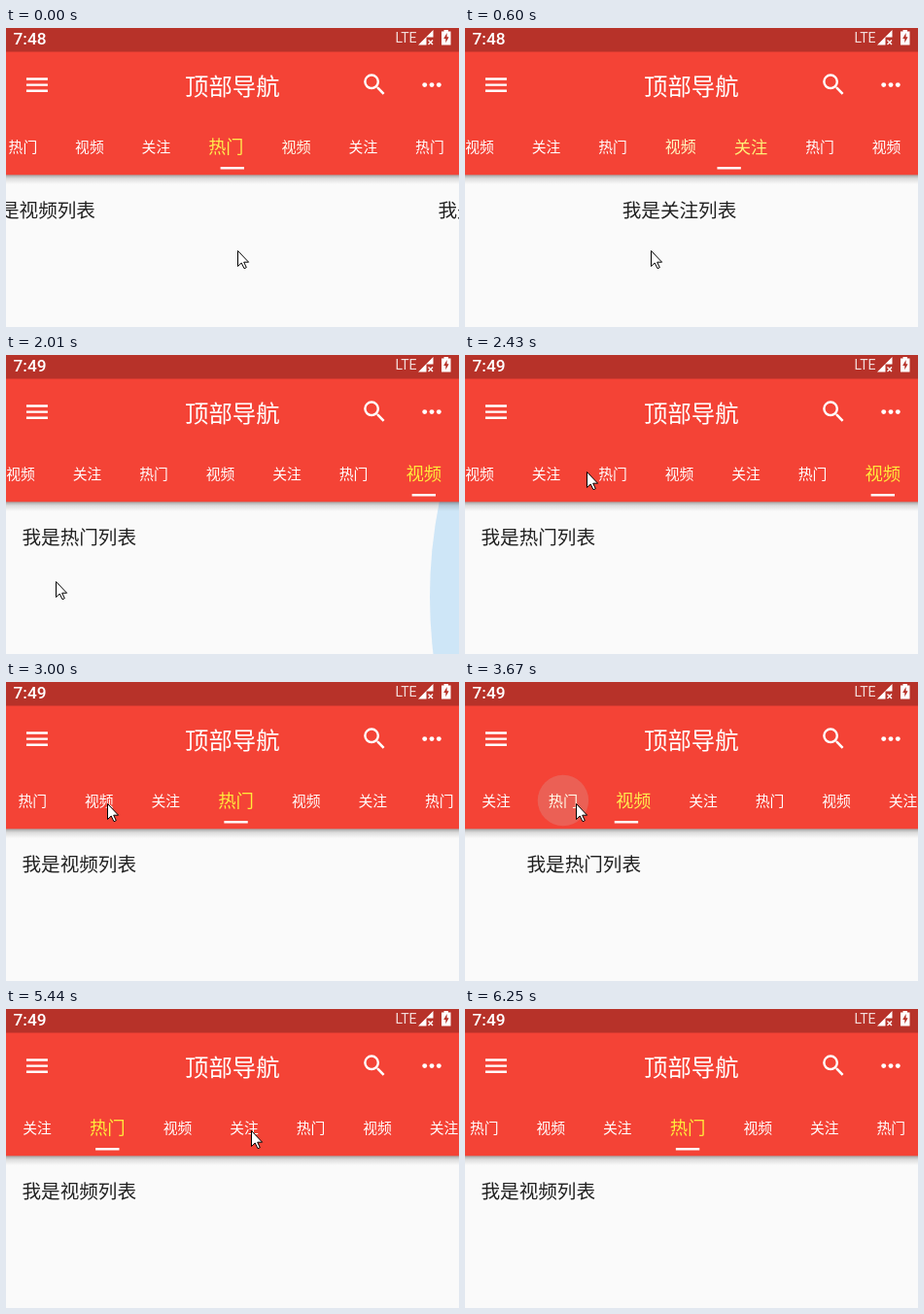
Recreate the animation shown at these times as an HTML page with a canvas. Size 466x308 px, loop 7120 ms.

```html
<!DOCTYPE html>
<html lang="zh-CN">
<head>
<meta charset="utf-8">
<style>
html, body { margin: 0; width: 100%; height: 100%; overflow: hidden; background: #fafafa; }
canvas { display: block; }
</style>
</head>
<body>
<canvas id="stage" width="466" height="308"></canvas>
<script>
const ctx = document.getElementById('stage').getContext('2d');
const CJK = '"Noto Sans CJK SC", "Noto Sans CJK JP", sans-serif';
const LOOP = 7120, WIDTH = 470, LEFT = -2.2, TAB = 68.5, GROW = 7.5, COUNT = 9;
const MAX_SCROLL = COUNT * TAB + GROW - WIDTH;
const LABELS = ['关注', '热门', '视频'];
const PAGES = LABELS.map((_, i) => `我是${LABELS[-i + 3 * (i > 0)]}列表`);

// Four evenly spaced swipes, then taps given as start time and tab
const swipes = [5, 6, 7, 8].map((to, n) => ({ start: 430 * n - 90, to, length: 430 }));
const taps = [[2578, 4], [3240, 2], [3640, 1], [4075, 3], [4870, 1], [5710, 4]]
  .map(([start, to]) => ({ start, to, length: 300, tap: true }));
const MOVES = [...swipes, ...taps];
MOVES.forEach((move, n) => move.from = n ? MOVES[n - 1].to : 4);

// Pointer stops: time, x, y
const STOPS = [
  [0, 239, 229], [1260, 200, 229], [2010, 51, 233], [2430, 125, 120], [2850, 104, 125],
  [3640, 104, 125], [4360, 328, 121], [4630, 88, 124], [4870, 88, 124], [5440, 252, 125],
  [5590, 318, 125], [5830, 318, 125], [6100, 400, 295], [6250, 400, 295]
];

const MENU = new Path2D('M3 6h18v2H3zm0 5h18v2H3zm0 5h18v2H3z');
const SEARCH = new Path2D('M15.5 14h-.79l-.28-.27A6.47 6.47 0 0 0 16 9.5 6.5 6.5 0 1 0 9.5 16c1.61 0 3.09-.59 4.23-1.57l.27.28v.79l5 4.99L20.49 19zm-6 0C7.01 14 5 11.99 5 9.5S7.01 5 9.5 5 14 7.01 14 9.5 11.99 14 9.5 14z');
const ARROW = new Path2D('M.5.5V16.5L4.2 13 7 18.7 9.3 17.7 6.7 12.2H11.6Z');
const SIGNAL = new Path2D('M424 17.5L439.5 2V9.5H432.5V17.5Z');
const NO_SIGNAL = new Path2D('M434.5 12.5l4.5 4.5m0-4.5l-4.5 4.5');
const BOLT = new Path2D('M453.6 5L450.2 11H452.3V15.2L455.6 9.2H453.6Z');

const clamp = (v, lo, hi) => Math.min(hi, Math.max(lo, v));
const mix = (a, b, k) => a + (b - a) * k;
const inOut = x => x < .5 ? 2 * x * x : 1 - 2 * (1 - x) ** 2;

// cubic-bezier(.25, .1, .25, 1)
function ease(x) {
  let lo = 0, hi = 1;
  for (let n = 0; n < 20; n++) {
    const u = (lo + hi) / 2, v = 1 - u;
    if (.75 * u * v + u ** 3 < x) lo = u; else hi = u;
  }
  return .3 * lo * (1 - lo) ** 2 + 3 * lo * lo * (1 - lo) + lo ** 3;
}

// A tap aims with the tab widths it had before the change
const tapScroll = ({ from, to }) =>
  clamp((to + .5) * TAB + (to > from ? GROW : 0) - WIDTH / 2, 0, MAX_SCROLL);
const swipeScroll = p => clamp((p + .5) * TAB + GROW / 2 - WIDTH / 2, 0, MAX_SCROLL);

function tabState(t) {
  const n = MOVES.findLastIndex(m => t >= m.start), move = MOVES[n];
  const x = clamp((t - move.start) / move.length, 0, 1);
  const q = move.tap ? ease(x) : inOut(x);
  if (!move.tap) return { ...move, q, scroll: swipeScroll(move.from + q) };
  const before = MOVES[n - 1];
  const old = before.tap ? tapScroll(before) : MAX_SCROLL;
  return { ...move, q, scroll: mix(old, tapScroll(move), q) };
}

function rect(x, y, w, h, color) {
  ctx.fillStyle = color;
  ctx.fillRect(x, y, w, h);
}

function disc(x, y, r, color) {
  ctx.fillStyle = color;
  ctx.beginPath();
  ctx.arc(x, y, r, 0, 7);
  ctx.fill();
}

function text(str, x, y, font, color, align = 'left') {
  ctx.font = font;
  ctx.fillStyle = color;
  ctx.textAlign = align;
  ctx.fillText(str, x, y);
}

function icon(path, x, y) {
  ctx.save();
  ctx.translate(x, y);
  ctx.scale(1.22, 1.22);
  ctx.fillStyle = '#fff';
  ctx.fill(path);
  ctx.restore();
}

function drawPage(t, { from, to, q }) {
  const dir = Math.sign(to - from);
  const line = (tab, offset) =>
    text(PAGES[tab % 3], 16.5 + offset * WIDTH, 195, `19.6px ${CJK}`, '#212121');
  if (q < 1) line(from, -dir * q);
  line(to, dir * (1 - q));

  // Overscroll glow at the last tab
  const glow = clamp((t - 1640) / 300, 0, 1) * clamp((2290 - t) / 200, 0, 1);
  if (glow) disc(931 + 30 * (1 - glow), 249, 495, `rgba(33,150,235,${.2 * glow})`);
}

function drawBar(t) {
  const shadow = ctx.createLinearGradient(0, 151, 0, 161);
  shadow.addColorStop(0, 'rgba(0,0,0,.36)');
  shadow.addColorStop(.4, 'rgba(0,0,0,.12)');
  shadow.addColorStop(1, 'rgba(0,0,0,0)');
  rect(0, 151, 466, 10, shadow);
  rect(0, 0, 466, 151.3, '#f44336');
  rect(0, 0, 466, 24.5, '#b73229');

  text(t < 750 ? '7:48' : '7:49', 7.5, 16.5, '500 17.3px Roboto, sans-serif', '#fff');
  text('LTE', 400.5, 15, '14px Roboto, sans-serif', '#f3dedc');
  ctx.fillStyle = ctx.strokeStyle = '#fff';
  ctx.lineWidth = 1.4;
  ctx.fill(SIGNAL);
  ctx.stroke(NO_SIGNAL);
  rect(450.5, 2, 4.5, 2, '#fff');
  rect(448, 3.5, 9.5, 14, '#fff');
  ctx.fillStyle = '#b73229';
  ctx.fill(BOLT);

  icon(MENU, 17.3, 44);
  text('顶部导航', 232.8, 69, `24.4px ${CJK}`, '#fff', 'center');
  icon(SEARCH, 364.5, 43.7);
  for (let n = -1; n < 2; n++) disc(438 + 7.3 * n, 58.6, 2.45, '#fff');
}

function drawRipple(t, { start, tap }, x, width) {
  const age = (t - start + 60) / 320;
  if (!tap || age >= 1) return;
  ctx.save();
  ctx.beginPath();
  ctx.rect(x, 93, width, 58.3);
  ctx.clip();
  disc(x + width / 2, 122, 12 + 50 * age, `rgba(200,200,200,${.3 * (1 - age)})`);
  ctx.restore();
}

function drawTabs(t, state) {
  const { from, to, q, scroll } = state;
  const centers = [];
  let x = LEFT - scroll;
  for (let i = 0; i < COUNT; i++) {
    const picked = i === to ? q : i === from ? 1 - q : 0;
    const width = TAB + GROW * picked, size = 14.8 + 3.6 * picked;
    if (i === to) drawRipple(t, state, x, width);
    centers[i] = x + width / 2;
    const color = `rgb(255,${mix(255, 235, picked)},${mix(255, 59, picked)})`;
    text(LABELS[i % 3], centers[i], Math.round(122.3 + size * .37), `${size}px ${CJK}`, color, 'center');
    x += width;
  }
  rect(mix(centers[from], centers[to], q) - 12.2, 143.1, 24.4, 2.4, '#fff');
}

function drawPointer(t) {
  const n = STOPS.findIndex(stop => t < stop[0]);
  if (n < 0) return;
  const [t0, x0, y0] = STOPS[n - 1], [t1, x1, y1] = STOPS[n];
  const k = (t - t0) / (t1 - t0);
  // Back and forth once per swipe
  const drag = t < 1260 ? -70 * Math.sin(t / 420 * 2 * Math.PI) : 0;
  ctx.save();
  ctx.translate(Math.round(mix(x0, x1, k) + drag), Math.round(mix(y0, y1, k)));
  ctx.fillStyle = '#fff';
  ctx.fill(ARROW);
  ctx.strokeStyle = '#000';
  ctx.lineWidth = 1;
  ctx.stroke(ARROW);
  ctx.restore();
}

function draw() {
  const t = performance.now() % LOOP;
  const state = tabState(t);
  rect(0, 0, 466, 308, '#fafafa');
  drawPage(t, state);
  drawBar(t);
  drawTabs(t, state);
  drawPointer(t);
  requestAnimationFrame(draw);
}
draw();
</script>
</body>
</html>
```
